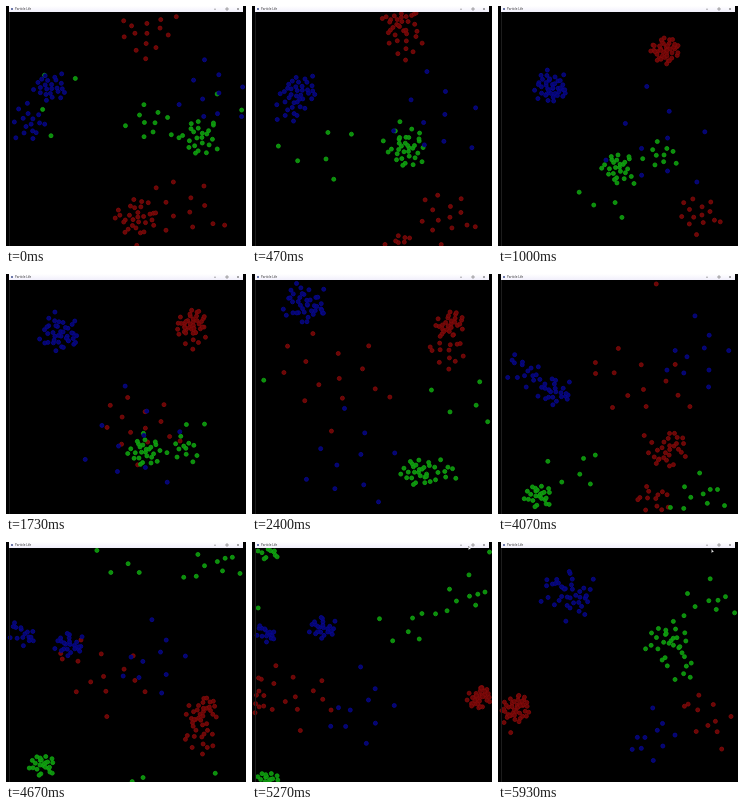
Write an HTML page with a canvas that moves like this. It is 240x240 px and loops after 5990 ms.

```html
<!DOCTYPE html>
<html lang="en">
<head>
<meta charset="utf-8">
<title>Particle Life</title>
<style>
  html, body { margin: 0; width: 100%; height: 100%; overflow: hidden; background: #000; }
  canvas { position: absolute; left: 0; top: 0; }
  .edge { position: absolute; left: 3px; top: 0; width: 1px; height: 240px; background: #1c1c1c; }
  .bar { position: absolute; left: 3px; top: 0; width: 234px; height: 6px; background: linear-gradient(#fff, #f1effb); }
  .icon { position: absolute; left: 2px; top: 2px; width: 2px; height: 2px; background: #6c78a8; }
  .name { position: absolute; left: 6px; top: 0; font: 3px/6px "Open Sans", "Noto Sans", sans-serif; color: #222; white-space: nowrap; }
  .bar svg { position: absolute; left: 204px; top: 0; }
  #pointer { position: absolute; left: 0; top: 0; visibility: hidden; }
</style>
</head>
<body>
<canvas id="stage" width="240" height="240"></canvas>
<div class="edge"></div>
<div class="bar">
  <div class="icon"></div>
  <div class="name">Particle Life</div>
  <svg width="30" height="6" fill="none" stroke="#555" stroke-width=".5">
    <path d="M1 3.2h2M13 2h2v2h-2zM24 2l2 2M26 2l-2 2"/>
  </svg>
</div>
<svg id="pointer" width="4" height="5"><path d="M.5 0v4l1-.9h1.4z" fill="#fff" stroke="#333" stroke-width=".3"/></svg>
<script>
const LOOP = 5990, STEPS = 90, STEP = 1000 / 15;
const LEFT = 3, TOP = 7, W = 235, H = 233;
const GOLDEN = Math.PI * (3 - Math.sqrt(5));
const keySteps = [0, 15, 36, 48, 61, 79, 89];

const mod = (v, n) => ((v % n) + n) % n;
let seed = 11;
const random = () => (seed = seed * 16807 % 2147483647) / 2147483647;

const red = { fill: '#6a0606', rim: '#860c0c' };
const green = { fill: '#0c8e0c', rim: '#14a814' };
const blue = { fill: '#05056e', rim: '#080892' };

// A flock drifts along x and y and breathes with its spread.
// Places run on past the stage and wrap around its edges.
function flock(color, count, x, y, spread) {
  const members = Array.from({ length: count }, (_, i) => ({
    angle: i * GOLDEN + 0.6 * random(),
    reach: ((i + 0.5) / count) ** 0.6 * (0.95 + 0.3 * random()),
    swirl: 0.02 * (random() - 0.5)
  }));
  return { color, members, x, y, spread };
}

const flocks = [
  flock(red, 28, [130, 167, 198, 182, 170, 227, 253], [211, 277, 283, 324, 409, 389, 399], [19, 13, 13, 14, 18, 11, 13]),
  flock(red, 14, [137, 167, 194, 160, 155, 235, 253], [26, 44, 76, 122, 225, 156, 166], [25, 13, 18, 16, 17, 14, 13]),
  flock(red, 14, [178, 201, 80, 155, 140, 40, -20], [205, 208, 100, 95, 110, 150, 175], [38, 20, 55, 50, 50, 38, 32]),

  flock(green, 24, [194, 120, 165, 201, 275, 250, 169], [131, 161, 198, 268, 222, 240, 334], [18, 14, 14, 11, 12, 11, 19]),
  flock(green, 10, [145, 163, 190, 207, 200, 212, 205], [115, 148, 197, 226, 220, 288, 293], [22, 16, 14, 20, 26, 28, 30]),
  flock(green, 6, [25, 110, 215, 210, 310, 385, 417], [100, 195, 130, 40, -33, 90, 132], [50, 30, 38, 26, 28, 26, 15]),

  flock(blue, 24, [44, 53, 53, 62, 56, 70, 72], [82, 82, 31, -83, -115, -147, -185], [15, 15, 20, 18, 15, 12, 21]),
  flock(blue, 16, [23, 53, 53, 44, 28, 15, 70], [118, 82, 31, -52, -135, -141, -175], [17, 15, 19, 14, 17, 9, 24]),
  flock(blue, 10, [207, 160, 100, 60, -35, -125, -80], [85, 130, 180, 150, 75, 160, 190], [35, 55, 50, 55, 36, 38, 26])
];

// Smooth curve through values at the key steps.
function curve(values, step) {
  const last = values.length - 1;
  let k = 0;
  while (k < last - 1 && step >= keySteps[k + 1]) k++;
  const span = keySteps[k + 1] - keySteps[k];
  const slope = i => {
    const a = Math.max(i - 1, 0), b = Math.min(i + 1, last);
    return 0.7 * span * (values[b] - values[a]) / (keySteps[b] - keySteps[a]);
  };
  const u = (step - keySteps[k]) / span, v = 1 - u;
  return v * v * ((1 + 2 * u) * values[k] + u * slope(k))
       + u * u * ((3 - 2 * u) * values[k + 1] - v * slope(k + 1));
}

const ctx = document.getElementById('stage').getContext('2d');
const pointer = document.getElementById('pointer');

function dot(x, y) {
  ctx.beginPath();
  ctx.arc(LEFT + mod(x - LEFT, W), TOP + mod(y - TOP, H), 2, 0, 2 * Math.PI);
  ctx.fill();
  ctx.stroke();
}

function draw(step) {
  ctx.fillStyle = '#000';
  ctx.fillRect(0, 0, 240, 240);
  ctx.lineWidth = 0.8;
  for (const { color, members, x, y, spread } of flocks) {
    ctx.fillStyle = color.fill;
    ctx.strokeStyle = color.rim;
    const cx = curve(x, step), cy = curve(y, step), size = curve(spread, step);
    for (const { angle, reach, swirl } of members) {
      const a = angle + swirl * step, r = size * reach;
      dot(cx + r * Math.cos(a), cy + r * Math.sin(a));
    }
  }
  const late = step - 79;
  pointer.style.visibility = late >= -2 ? 'visible' : 'hidden';
  pointer.style.transform = `translate(${216 - 0.3 * late}px, ${4 + 0.3 * late}px)`;
}

// Steps begin on whole hundredths of a second.
const begins = step => Math.round(step * STEP / 10) * 10;
const start = performance.now();
let shown = -1;

function tick() {
  const t = mod(performance.now() - start, LOOP);
  let step = Math.min(STEPS - 1, Math.floor(t / STEP) + 1);
  while (begins(step) > t) step--;
  if (step !== shown) draw(shown = step);
  requestAnimationFrame(tick);
}
tick();
</script>
</body>
</html>
```
